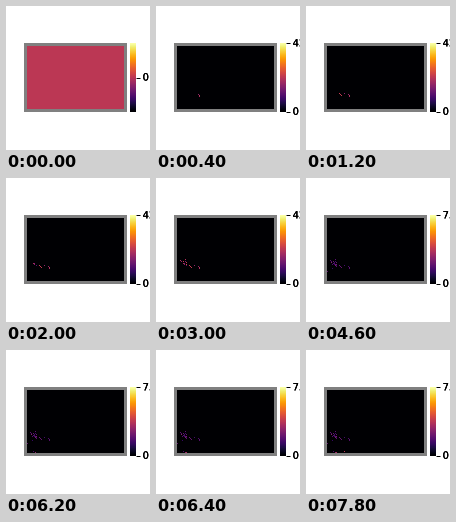
A matplotlib script that plays this animation: 144 by 144 pixels, repeating every 8000 ms.

```python
import numpy as np
import matplotlib.pyplot as plt
from matplotlib.animation import FuncAnimation
from matplotlib.patheffects import Normal

SIZE, STEP, FRAMES = 144, 200, 40
LEFT, RIGHT, TOP, BOTTOM = 18, 121, 37, 106
WALL = 3
BAR = slice(124, 130)
MID = (TOP + BOTTOM) / 2
inferno = plt.get_cmap("inferno")

# step: cells first visited then
TRAIL = {
    2: [(42, 88), (43, 89), (43, 90)],
    5: [(38, 87)],
    6: [(33, 87), (34, 88), (35, 89)],
    8: [(30, 87)],
    9: [(28, 85)],
    10: [(27, 85), (28, 86)],
    11: [(25, 83), (24, 82)],
    13: [(27, 83), (29, 81)],
    14: [(29, 83)],
    15: [(30, 84), (30, 86)],
    17: [(28, 84), (30, 88)],
    18: [(26, 86), (29, 87)],
    19: [(26, 90)],
    21: [(21, 93)],
    23: [(25, 84), (29, 86)],
    31: [(27, 101), (29, 102)],
    32: [(30, 102)],
    39: [(38, 101)],
}
# step at which each peak count is reached
PEAKS = {0: 0, 2: 42, 16: 43, 17: 49, 18: 55, 23: 75}

fig = plt.figure(figsize=(2, 2), dpi=72, facecolor="white")
ax = fig.add_axes([0, 0, 1, 1])
ax.set_axis_off()


def peak_at(step):
    return [peak for start, peak in PEAKS.items() if start <= step][-1]


def count_visits(step):
    rng = np.random.default_rng(4)
    counts = np.zeros((SIZE, SIZE))
    for start, cells in TRAIL.items():
        for x, y in cells:
            visits = rng.integers(9, 20) * (1 + start / FRAMES)
            if start <= step:
                counts[y, x] = visits
    return counts


def paint(step):
    img = np.ones((SIZE, SIZE, 3))
    img[TOP:BOTTOM, LEFT:RIGHT] = 128 / 255
    peak = peak_at(step)
    counts = count_visits(step)
    level = counts / peak if peak else np.full_like(counts, 0.5)
    room = (slice(TOP + WALL, BOTTOM - WALL), slice(LEFT + WALL, RIGHT - WALL))
    img[room] = inferno(level[room])[..., :3]
    ramp = inferno(np.linspace(1, 0, BOTTOM - TOP))[:, :3]
    if not peak:
        ramp = inferno(np.linspace(1, 0, BOTTOM - TOP))[:, :3]
    img[TOP:BOTTOM, BAR] = ramp[:, None]
    return img


picture = ax.imshow(paint(0), extent=(0, SIZE, SIZE, 0),
                    interpolation="nearest", aspect="auto")
ax.set_xlim(0, SIZE)
ax.set_ylim(SIZE, 0)


def make_tick():
    mark, = ax.plot([130, 133.5], [MID, MID], color="black", lw=1,
                    solid_capstyle="butt")
    # repeated drawing hardens the edges of the small digits
    label = ax.text(136.6, MID, "0", fontsize=10, family="DejaVu Sans",
                    va="center", path_effects=[Normal()] * 3)
    return mark, label


def set_tick(tick, value, y):
    mark, label = tick
    mark.set_ydata([y, y])
    label.set_y(y)
    label.set_text(value)


low, high = make_tick(), make_tick()


def update(step):
    peak = peak_at(step)
    picture.set_data(paint(step))
    set_tick(low, "0", BOTTOM - 0.3 if peak else MID)
    set_tick(high, str(peak), TOP + 0.4)
    for part in high:
        part.set_visible(peak > 0)
    return [picture, *low, *high]


anim = FuncAnimation(fig, update, frames=FRAMES, interval=STEP,
                     repeat=True, repeat_delay=0)
plt.show()
```
